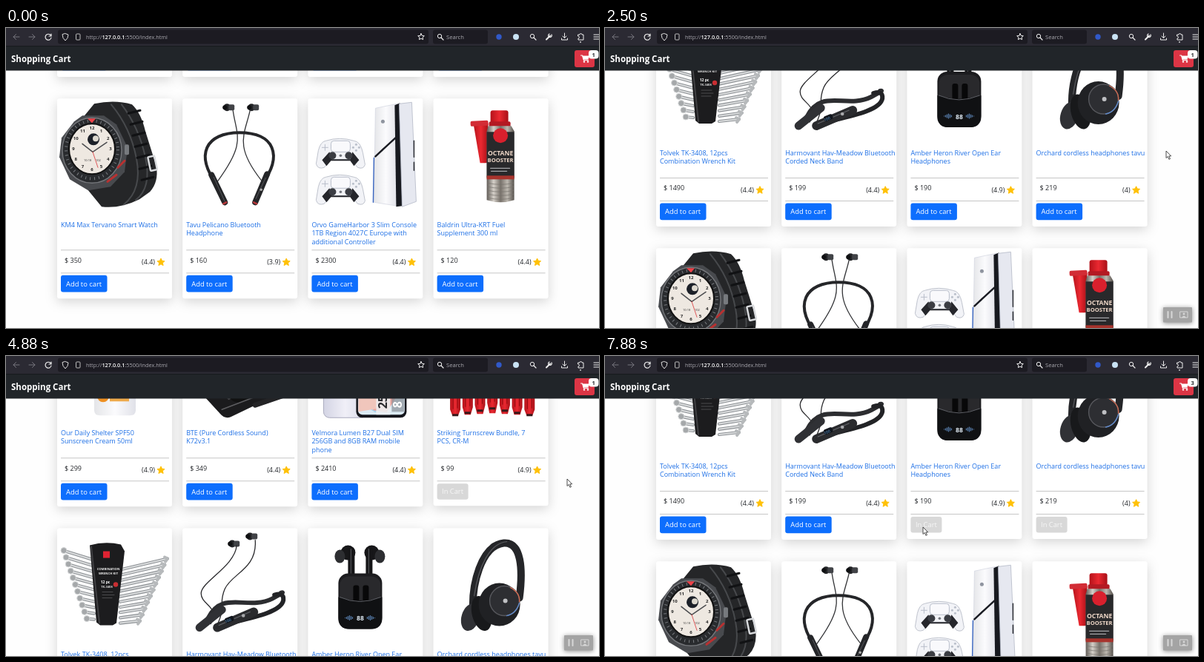
Write an HTML page that moves like this. It is 800x405 px and loops after 8 s.

```html
<!DOCTYPE html>
<html lang="en">
<head>
<meta charset="utf-8">
<title>Shopping Cart</title>
<style>
  html, body { margin: 0; width: 100%; height: 100%; overflow: hidden; background: #fefefe; }
  svg { display: block; width: 800px; height: 405px; }
  text { font-family: "Open Sans", "Noto Sans", sans-serif; white-space: pre; }
  .card { fill: #fff; filter: drop-shadow(0 4px 8px rgba(0, 0, 0, .17)); }
  .overlay { filter: drop-shadow(0 1px 3px rgba(0, 0, 0, .45)); }
</style>
</head>
<body>
<svg id="stage" viewBox="0 0 800 405"></svg>
<script>
const LOOP = 8000, TICK = 125;
const ROW_PITCH = 299.3, COL_PITCH = 169.2, CARD_X = 69;

// Drawing helpers
const rect = (x, y, w, h, fill, r = 0, extra = '') =>
  `<rect x="${x}" y="${y}" width="${w}" height="${h}" rx="${r}" fill="${fill}" ${extra}/>`;
const oval = (x, y, rx, ry, fill, extra = '') =>
  `<ellipse cx="${x}" cy="${y}" rx="${rx}" ry="${ry}" fill="${fill}" ${extra}/>`;
const disc = (x, y, r, fill, extra) => oval(x, y, r, r, fill, extra);
const shape = (d, fill, extra = '') => `<path d="${d}" fill="${fill}" ${extra}/>`;
const line = (d, color, width = 1, extra = '') =>
  `<path d="${d}" fill="none" stroke="${color}" stroke-width="${width}" stroke-linecap="round" stroke-linejoin="round" ${extra}/>`;
const text = (x, y, str, size, fill, extra = '') =>
  `<text x="${x}" y="${y}" font-size="${size}" fill="${fill}" ${extra}>${str}</text>`;
const group = (body, transform = '', extra = '') => `<g transform="${transform}" ${extra}>${body}</g>`;
const repeat = (n, fn) => Array.from({ length: n }, (_, i) => fn(i)).join('');
const MID = 'text-anchor="middle"', BOLD = 'font-weight="700"';

const star = (x, y, r) => {
  const points = Array.from({ length: 10 }, (_, i) => {
    const a = i * Math.PI / 5, q = i % 2 ? r * .48 : r;
    return `${(x + q * Math.sin(a)).toFixed(1)} ${(y - q * Math.cos(a)).toFixed(1)}`;
  });
  return `M${points.join('L')}Z`;
};

// Product pictures, in card coordinates
const sunscreen = () =>
  shape('M51 24Q51 13 63 12H93Q105 13 105 24L106 53H50Z', 'url(#orange)') +
  shape('M50 53H106L106 140Q106 147 98 147H58Q50 147 50 140Z', 'url(#cream)') +
  line('M50 54H106', '#d9d9da') + rect(70, 69, 14, 14, '#f29a24') +
  text(78, 93, 'SUNSCREEN', 7.2, '#777', MID + ' font-weight="600"') +
  text(82, 100, 'FLUID', 6, '#ee9c2c', MID + BOLD) +
  shape('M55 108L64 99 67 106 76 108 72 116H54Z', '#f4a12f') +
  rect(71, 109, 30, 4, '#e99b36') + rect(71, 114, 30, 7, '#58a9d2') + rect(71, 122, 26, 6, '#eeaa4b') +
  disc(62, 121, 8, '#ee8f20') + text(62, 124, '50', 8, '#fff', MID + BOLD);

const budCase = () =>
  shape('M14 36Q18 18 29 14L92 5Q101 5 103 14L101 51 24 80Q14 75 14 64Z', '#171719') +
  shape('M21 36L29 21 91 12 96 42 25 68Z', '#2d2d30') + line('M17 36Q21 20 30 17L93 8', '#86868a', 1.4) +
  text(33, 54, '[ 100 ]', 9, '#b5b7ba', 'transform="rotate(-13 33 54)"') +
  shape('M16 82L101 46Q109 44 113 51L142 95V112L65 149Q57 152 51 145L18 109Z', '#1b1b1d') +
  shape('M24 83L99 54Q106 52 111 59L135 93 62 126Z', '#48484b') +
  shape('M46 75L100 58 105 72 49 91Z', '#151517', 'stroke="#87878b"') +
  text(67, 80, '100', 9, '#ddd', 'transform="rotate(-15 67 80)"') +
  [[79, 116], [116, 92]].map(([x, y]) => oval(x, y, 17, 13, '#111', `transform="rotate(-18 ${x} ${y})"`) +
    oval(x - 3, y - 4, 10, 6, '#303035') + line(`M${x - 13} ${y - 4}Q${x} ${y - 14} ${x + 12} ${y - 6}`, '#666870')).join('') +
  line('M53 139L142 105', '#5d5d60', 1.5) + line('M98 133L139 119', '#242426', 7);

const phones = () =>
  rect(21, 6, 58, 144, 'url(#lilac)', 8, 'stroke="#a9aabd"') +
  [20, 39, 58].map(y => disc(33, y, 6.5, '#b8bbcb', 'stroke="#e9e9f2" stroke-width="2"') + disc(33, y, 3, '#343848')).join('') +
  rect(65, 6, 68, 144, '#15161c', 8) + rect(67.5, 9, 63, 137, '#dcebf5', 6) +
  shape('M68 61L130 19V90L91 143 68 129Z', '#a9d4ee') + shape('M80 101L130 46V105L106 143 88 140Z', '#e9a29b') +
  shape('M68 117L103 88 92 138 68 142Z', '#f0c6bc') + line('M81 107L111 80M78 120L112 98', '#e8705b', 2) +
  rect(92, 24, 19, 122, '#eef2f4dd') + rect(113, 43, 17, 99, '#8c9299bb') +
  text(0, 0, '256 GB  5G', 16, '#292b2f', BOLD + ' transform="translate(107 138) rotate(-90)"') +
  text(0, 0, '8 GB', 16, '#fff', BOLD + ' transform="translate(127 137) rotate(-90)"') +
  text(0, 0, 'VIETNAM', 10, '#fff', BOLD + ' transform="translate(126 91) rotate(-90)"');

const drivers = () => repeat(7, i => {
  const x = 29.5 + 16.7 * i, tall = 3 - Math.abs(3 - i), top = 49 - tall * 9, y = 87 - tall * 3;
  return line(`M${x} ${top}V${y}`, '#9b9da1', 3) + line(`M${x - .6} ${top}V${y}`, '#e3e4e7', 1) +
    line(`M${x} ${top - 3}V${top + 5}`, '#44464a', 2) +
    shape(`M${x - 5} ${y}h10l2 7-2 7 2 9v29l-3 ${8 + tall * 2}h-8l-3-${8 + tall * 2}v-29l2-9-2-7z`, 'url(#red)') +
    line(`M${x - 3} ${y + 25}v26M${x + 3} ${y + 22}v28`, '#8d080c') + rect(x - 4, y + 58, 8, 3, '#35191b');
});

const spanners = () => repeat(11, i => {
  const y = 43 + i * 8, l = 8 + i * 3.1, ly = 30 + i * 9.2, r = 149 - i * 3.7, ry = 41 + i * 8.4;
  const d = `M${l} ${ly}L50 ${y}M85 ${y + 13 - i * .8}L${r} ${ry}`;
  return line(d, '#8d9195', 4.2) + line(d, '#dadcdd', 2) +
    disc(l + 1, ly, 4, '#a5a8aa', 'stroke="#d6d8d9"') + line(`M${r - 4} ${ry - 2}l4 2-3 4`, '#b6b9bb', 4);
}) +
  shape('M44 23Q65 17 86 22L91 31 80 128 75 131H58L53 127Z', '#1c1c1e') + line('M46 25L57 128', '#404043', 2) +
  rect(62, 31, 9, 9, '#e02332') +
  text(69, 56, 'COMBINATION', 4.2, '#eee', MID + BOLD) + text(69, 62, 'WRENCH KIT', 4.2, '#eee', MID + BOLD) +
  text(65, 74, '12 pc', 5, '#fff', MID + BOLD) + text(67, 80, 'TK-3408', 4, '#ddd', MID + BOLD) +
  disc(79, 76, 3.2, '#c92e32') + line('M61 86H75M61 90H77M61 94H74', '#57575a', .8);

const bud = (x, y) => disc(x, y, 5, '#222326') + rect(x + 2, y - 4, 8, 8, '#414347', 2) + disc(x - 3, y, 3, '#0f1012');

const wiredBand = () => bud(67, 21) + bud(91, 11) +
  line('M73 23C71 51 25 72 25 88S51 105 38 129', '#29292c', 1.3) +
  line('M98 16C101 55 66 61 57 82S59 104 47 130', '#29292c', 1.3) +
  line('M34 122C54 82 87 112 121 95Q140 85 133 87', '#2c2d30', 6) +
  line('M48 132C80 123 133 116 136 97Q137 86 124 90', '#222326', 6) +
  line('M23 134L53 110', '#303135', 11) + line('M47 134L96 113', '#2a2b2e', 12) +
  line('M49 131L91 113', '#626469', 1.2) + rect(57, 120, 12, 7, '#11151c', 2, 'transform="rotate(-22 62 123)"') +
  text(58, 128, '100', 5, '#65adeb', 'transform="rotate(-22 58 128)"') + disc(82, 118, 2.3, '#a7a8ab');

const openBuds = () =>
  [[-1, 58], [1, 82]].map(([s, x]) => disc(x - s * -4, 33, 10, '#171719') + oval(x + s * 15, 38, 7, 9, '#2d2e31') +
    rect(x - 4, 26, 9, 45, '#161618', 4) + line(`M${x} 28V61`, '#4f5054', 1.2)).join('') +
  rect(41, 61, 59, 75, '#1c1c1f', 13) + rect(43, 65, 55, 43, '#29292c', 12) +
  shape('M41 93Q70 102 100 93V121Q99 136 84 136H56Q42 136 41 121Z', '#101113') +
  rect(61, 77, 8, 22, '#080809', 3) + rect(74, 77, 8, 22, '#080809', 3) +
  line('M43 93Q70 105 98 93', '#5d5f65') + text(70.5, 124.5, '88', 8.5, '#e3eef7', MID + BOLD) +
  repeat(6, i => [50 + i * 2, 90 - i * 2].map(x => line(`M${x} ${121 - 3 + Math.abs(3 - i)}V${121 + 3 - Math.abs(3 - i)}`, '#6898d0', 1)).join(''));

const headset = () =>
  line('M54 119C50 76 65 23 95 20C119 18 121 56 116 94', '#252629', 10) +
  line('M55 91C61 51 76 20 99 18', '#55565a', 1.3) +
  oval(50, 120, 12, 19, '#303135', 'transform="rotate(17 50 120)"') +
  oval(65, 115, 13, 24, '#18191b', 'transform="rotate(-14 65 115)"') + oval(89, 103, 28, 29, '#202124') +
  disc(96, 98, 20, '#2d2e32', 'stroke="#57585d" stroke-width="1.4"') +
  line('M104 80Q117 87 116 99', '#d06b52', 1.4) + line('M116 101Q111 116 99 118', '#628bcc', 1.4) + disc(97, 98, 3, '#bfc0c3');

const watch = () =>
  shape('M32 29L50 7Q78 1 101 8Q113 19 119 44L134 92Q137 113 125 126L111 136Q85 149 60 146L42 124Z', '#252628') +
  line('M73 8Q99 39 107 81T90 143M87 8Q110 38 119 79T106 137', '#47494c', 2) +
  repeat(7, i => line(`M${96 + i * 3} ${20 + i * 15}l16-4`, '#111214', 3)) +
  rect(124, 78, 9, 19, 'none', 1, 'stroke="#d8dadd" stroke-width="2.5" transform="rotate(-12 128 87)"') +
  shape('M23 31L34 23H63L80 35 95 66 91 99 72 119 42 124 17 109 3 79 6 53Z', '#484a4e') +
  oval(47, 70, 40, 44, '#292b2e', 'stroke="#75777b" stroke-width="1.4"') +
  oval(47, 69, 35, 39, 'none', 'stroke="#777a7e" stroke-width="4" stroke-dasharray="1 5"') +
  oval(47, 68, 31, 34, '#eee8e1', 'stroke="#111" stroke-width="2"') +
  repeat(12, i => {
    const a = i * Math.PI / 6;
    return text((47 + 25 * Math.sin(a)).toFixed(1), (70 - 28 * Math.cos(a)).toFixed(1), i || 12, 6, '#252525', MID + BOLD);
  }) +
  disc(49, 55, 8, '#1c2028') + disc(52, 54, 4, '#ddd8ce') + line('M48 72L34 61M48 72L67 59', '#4c4d50', 1.5) +
  line('M48 72L55 93', '#da3135', .8) + text(36, 85, '10:18', 4, '#333') + text(52, 85, '102', 4, '#333') +
  shape('M41 27H52L47 33Z', '#ef4248') + line('M82 93L91 84M68 112L80 103', '#b83131', 3) + rect(91, 62, 6, 14, '#777a7e', 2);

const neckband = () => bud(60, 12) + bud(93, 12) +
  line('M68 16C73 51 86 59 47 112M91 16C84 48 69 63 106 110', '#333437', 1.3) +
  line('M47 117C16 76 31 46 77 46S137 76 106 117', '#252629', 4) +
  line('M39 103L57 140M114 102L98 140', '#242528', 8) + line('M42 106L57 139M112 107L99 135', '#56585c', 1) +
  line('M55 142L59 140M96 140L100 142', '#b8373a', 2.5) + disc(106, 123, 1.8, '#aaa');

const controller = y => group(
  shape('M15 4Q34-2 53 4Q62 5 65 20L68 36Q66 43 58 40L49 29H21L13 40Q4 43 2 35L5 17Q8 5 15 4Z', '#f2f3f7', 'stroke="#bfc3cd"') +
  shape('M20 19L23 29H48L51 19 60 30 53 38 48 31H22L16 38 10 30Z', '#25262b') +
  rect(22, 4, 26, 15, '#f9f9fc', 4, 'stroke="#b9bfcb"') + disc(24, 24, 5, '#3b3d43') + disc(46, 24, 5, '#3b3d43') +
  line('M14 9v8M10 13h8', '#b9bfca') + [[56, 9], [60, 13], [56, 17], [52, 13]].map(([x, y]) => disc(x, y, 1.5, '#b9bfca')).join('') +
  disc(35, 24, 1.8, '#74777e'), `translate(9 ${y})`);

const gameBox = () => controller(53) + controller(102) +
  shape('M91 13L120 7 121 145 89 140Z', 'url(#cream)', 'stroke="#d1d4e0" stroke-width=".7"') +
  shape('M117 9L124 6 127 145 119 146Z', '#17191f') +
  shape('M123 7L140 5 146 139 127 146Z', '#e6e8f0', 'stroke="#b4b9c7" stroke-width=".8"') +
  line('M91 78L118 53', '#1a1c23', 2.5) + line('M89 80L88 140', '#3a66c0', 1.4) +
  line('M143 57V79M143 86V97', '#292b31', 1.5) + disc(101, 31, 2.5, '#8f949f');

const booster = () =>
  shape('M55 35L68 31 78 55 73 87 64 86Z', '#b61d28') + shape('M54 34L74 34 71 87 63 87Z', 'url(#red)') +
  rect(50, 30, 24, 7, '#d22c35', 2, 'transform="rotate(-3 62 33)"') +
  rect(77, 16, 24, 17, 'url(#red)', 3) + rect(75, 31, 29, 7, '#b31a23', 2) +
  shape('M74 37H105L109 44V137Q91 143 72 137V44Z', 'url(#steel)') +
  rect(72, 45, 37, 62, '#29292b') + disc(90.5, 50, 10, '#d9202d') +
  text(90.5, 77, 'OCTANE', 8.6, '#f0d9c9', MID + BOLD) + text(90.5, 86, 'BOOSTER', 7.6, '#f0d9c9', MID + BOLD) +
  line('M77 94H103M78 98H99', '#a3a4a7', 1.3) + rect(72, 104, 37, 5, '#a8342d') +
  repeat(5, i => line(`M73 ${114 + i * 5}Q91 ${118 + i * 5} 108 ${114 + i * 5}`, '#77736d', .7));

// Each product: title lines, price, rating, picture
const products = [
  ['Our Daily Shelter SPF50|Sunscreen Cream 50ml', 299, 4.9, sunscreen],
  ['BTE (Pure Cordless Sound)|K72v3.1', 349, 4.4, budCase],
  ['Velmora Lumen B27 Dual SIM|256GB and 8GB RAM mobile|phone', 2410, 4.4, phones],
  ['Striking Turnscrew Bundle, 7|PCS, CR-M', 99, 4.9, drivers],
  ['Tolvek TK-3408, 12pcs|Combination Wrench Kit', 1490, 4.4, spanners],
  ['Harmovant Hav-Meadow Bluetooth|Corded Neck Band', 199, 4.4, wiredBand],
  ['Amber Heron River Open Ear|Headphones', 190, 4.9, openBuds],
  ['Orchard cordless headphones tavu', 219, 4, headset],
  ['KM4 Max Tervano Smart Watch', 350, 4.4, watch],
  ['Tavu Pelicano Bluetooth|Headphone', 160, 3.9, neckband],
  ['Orvo GameHarbor 3 Slim Console|1TB Region 4027C Europe with|additional Controller', 2300, 4.4, gameBox],
  ['Baldrin Ultra-KRT Fuel|Supplement 300 ml', 120, 4.4, booster],
];

const button = (inCart, hover) => inCart
  ? rect(5, 239, 42, 21.5, '#d8d8d8', 3) + text(11.5, 253, 'In Cart', 9.3, '#f7f7f7')
  : rect(5, 238.5, 62.5, 22.8, hover ? '#0b5ed7' : '#0d6efd', 3) + text(12, 253.3, 'Add to cart', 9.4, '#fff');

const card = ([title, price, rating, picture], i) => group(
  `<rect class="card" width="155" height="270" rx="3"/>` + picture() +
  title.split('|').map((s, n) => text(5, 173.5 + n * 11.7, s, 9, '#1d6fe6')).join('') +
  rect(5, 204, 146, 1, '#c6c6c6') + rect(5, 235, 146, 1, '#c6c6c6') +
  text(10, 221.4, '$ ' + price, 9, '#26292d') + text(132, 224.2, `(${rating})`, 9, '#26292d', 'text-anchor="end"') +
  shape(star(140, 221, 5.3), '#ffc107', 'stroke="#ffc107" stroke-linejoin="round"') + '<g class="btn"></g>',
  `translate(${CARD_X + COL_PITCH * (i % 4)} ${ROW_PITCH * (Math.floor(i / 4) - 1)})`, 'class="item"');

const gradient = (id, ...colors) => `<linearGradient id="${id}">` +
  colors.map((c, i) => `<stop offset="${i / (colors.length - 1)}" stop-color="${c}"/>`).join('') + '</linearGradient>';

const lens = (x, y) => disc(x, y, 2.7, 'none', 'stroke="#eee"') + line(`M${x + 2} ${y + 2}l3 3`, '#eee', 1.2);

const browserBar = () => rect(0, 0, 800, 24, '#2b2a33') + rect(70, 2.5, 500, 19, '#1c1b22', 3) + rect(576, 2.5, 74, 19, '#1c1b22', 3) +
  line('M18 12H10M13.5 8.5L10 12l3.5 3.5M31 12h8M35.5 8.5L39 12l-3.5 3.5', '#77767e') +
  line('M60 9.5A4 4 0 1 0 61 13M61 8v3h-3', '#eee', 1.2) +
  line('M80 7.5l4 1.5q0 5-4 8-4-3-4-8z', '#ddd') + rect(94.5, 8, 5.5, 8, 'none', 1, 'stroke="#bbb"') +
  text(108, 15, 'http://<tspan fill="#fff" font-weight="600">127.0.0.1</tspan>:5500/index.html', 7.3, '#aaa9b0') +
  line(star(560, 12, 4.5), '#eee') + lens(585, 11) + text(594, 15, 'Search', 7.6, '#aaa9b0') +
  disc(665, 12, 3.7, '#3159c9') + disc(688, 12, 4, '#c9e3f5') + lens(710, 11) +
  line('M729 15.5l5-5', '#eee', 2) + line('M736 9a2.3 2.3 0 1 1-3-1', '#eee', 1.3) +
  line('M753.500 7v6M751 11l2.500 2.500 2.500-2.500M749.500 14v2h8v-2', '#eee') +
  line('M772 9h2a1.500 1.500 0 1 1 3 0h2v7h-7v-2a1.500 1.500 0 1 0 0-3z', '#eee') + disc(775, 19, 1, '#ccc') +
  line('M793 9h7M793 12h7M793 15h7', '#eee');

const navBar = () => rect(0, 24, 800, 33.5, '#212529') + rect(0, 24, 800, 1, '#17191d') +
  text(7, 46.2, 'Shopping Cart', 11.5, '#fff', BOLD) +
  rect(767, 30, 27, 23, '#dc3545', 3) + line('M775.500 37h2l2 6.500h6', '#fff', 1.2) + shape('M777.500 37.500H787l-1.500 5h-6.500z', '#fff') +
  disc(780, 45.5, 1.2, '#fff') + disc(785, 45.5, 1.2, '#fff') + rect(786, 30, 13.5, 11.5, '#fff', 4) +
  text(792.7, 38.700, '1', 7.5, '#26292d', `${MID} ${BOLD} id="count"`);

const recorder = () => rect(753, 377, 39, 20.5, '#a4a4a4', 1, 'class="overlay"') +
  line('M759.500 383v8M764.500 383v8', '#d7d7d7', 2) +
  line('M776 383h10v8h-10z', '#d7d7d7') + disc(781, 386, 1.4, '#d7d7d7') + shape('M778 391q3-5 6 0z', '#d7d7d7');

const pointer = () => shape('M0 0V9.500l2.200-2 1.700 3.800 1.600-.7-1.700-3.700h2.900z', '#fff', 'stroke="#222" stroke-width=".8"') +
  group(disc(9, 1, 4, '#d5eafb', 'stroke="#3f8fe6" stroke-width="1.8"'), '', 'id="busy"');

const stage = document.getElementById('stage');
stage.innerHTML = '<defs>' +
  gradient('orange', '#e79518', '#f9b74b', '#e28e13') + gradient('cream', '#e4e5e8', '#fbfbfd', '#e0e1e8') +
  gradient('lilac', '#d3d4e4', '#f0eff7', '#d9dbea') + gradient('red', '#b5121a', '#ea2931', '#a81017') +
  gradient('steel', '#5f5a55', '#d5d0c9', '#77716a', '#bdb8b0', '#55504b') + '</defs>' +
  rect(0, 0, 800, 405, '#fefefe') + group(products.map(card).join(''), '', 'id="page"') +
  navBar() + browserBar() + group(recorder(), '', 'id="recorder"') + group(pointer(), '', 'id="pointer"');

// Motion: rows of [time, ...values]
const scroll = [[1000, -204], [1250, -172], [1375, -172], [1500, -143], [1750, -112], [1875, -112], [2500, -2],
  [2750, 100], [2875, 100], [3125, 220], [3375, 262], [3500, 262], [4000, 341], [4125, 347], [4500, 347], [5375, 80], [5875, -22]];
const path = [[125, 770, 385], [750, 756, 165], [1875, 756, 165], [2000, 757, 166], [5500, 757, 166],
  [6250, 622, 229], [6625, 622, 229], [6875, 520, 246], [7125, 432, 234], [7250, 429, 231]];

function sample(track, t) {
  const next = track.findIndex(key => key[0] > t);
  if (next < 0) return track.at(-1).slice(1);
  if (next === 0) return track[0].slice(1);
  const a = track[next - 1], b = track[next], p = (t - a[0]) / (b[0] - a[0]);
  return a.slice(1).map((v, i) => v + (b[i + 1] - v) * p);
}

const find = id => document.getElementById(id);
const show = (id, on) => find(id).setAttribute('visibility', on ? 'visible' : 'hidden');
const items = [...stage.querySelectorAll('.item')];
const addedAt = { 3: -1, 7: 6500, 6: 7375 };

function render(t) {
  const [top] = sample(scroll, t), [x, y] = sample(path, t);
  find('page').setAttribute('transform', `translate(0 ${top})`);
  find('pointer').setAttribute('transform', `translate(${x} ${y})`);
  show('pointer', t >= 125);
  show('recorder', t >= 250);
  show('busy', t >= 5000 && t < 5750);
  let count = 0;
  items.forEach((item, i) => {
    const inCart = t >= (addedAt[i] ?? Infinity);
    const dx = x - CARD_X - COL_PITCH * (i % 4), dy = y - top - ROW_PITCH * (Math.floor(i / 4) - 1);
    const hover = dx > 5 && dx < 67 && dy > 238 && dy < 261;
    const state = `${inCart}${hover}`;
    count += inCart;
    if (item.dataset.state === state) return;
    item.dataset.state = state;
    item.querySelector('.btn').innerHTML = button(inCart, hover);
    item.querySelector('.card').setAttribute('height', inCart ? 269 : 270);
  });
  find('count').textContent = count;
}

const start = performance.now();
function frame() {
  const t = (performance.now() - start) % LOOP;
  render(Math.floor(t / TICK) * TICK);
  requestAnimationFrame(frame);
}
frame();
</script>
</body>
</html>
```
